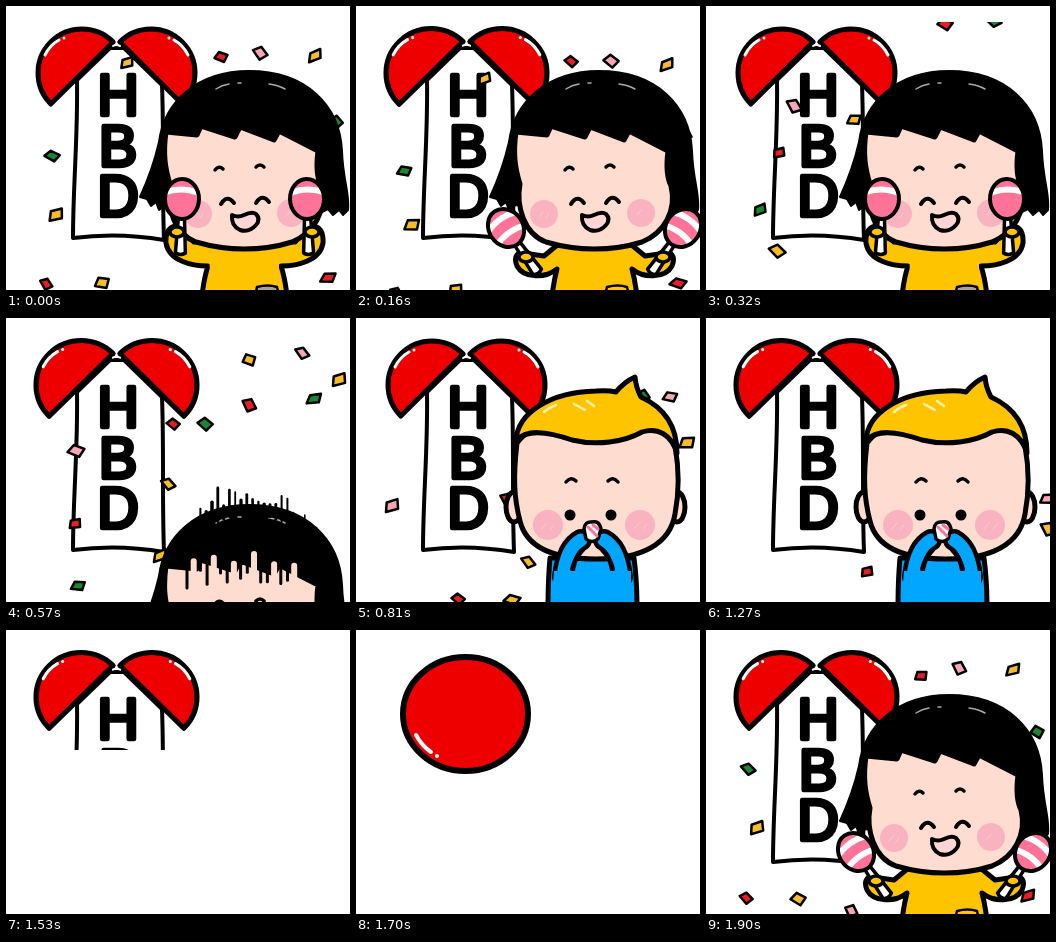
Write an HTML page with a canvas that moves like this. It is 344 by 284 pixels and loops after 2 s.

```html
<!DOCTYPE html>
<html lang="en">
<head>
<meta charset="utf-8">
<title>Birthday party</title>
<style>
html, body { margin: 0; width: 100%; height: 100%; overflow: hidden; background: #fff; }
canvas { display: block; }
</style>
</head>
<body>
<canvas id="stage" width="344" height="284"></canvas>
<script>
const ctx = document.getElementById('stage').getContext('2d');
const LOOP = 2000;
const STEPS = [0, 90, 170, 250, 320, 410, 490, 570, 640, 730, 810, 970, 1070, 1270, 1430, 1530, 1610, 1700, 1800, 1900];
const RED = '#ee0000', YELLOW = '#ffc400', SKIN = '#ffdcd0', BLUSH = '#f9b3c0', PINK = '#ff7399', BLUE = '#00a6ff';
const PAPER = { r: '#ec1c24', p: '#f8a5b5', y: '#f6bd27', g: '#168a30' };

// Confetti: colour, index of the first key time, then x, y for each key
const KEYS = [-100, 0, 320, 570, 810, 1270];
const CONFETTI = [
  ['r', 0, 215, 46, 215, 51], ['p', 0, 253, 38, 254, 47], ['y', 0, 307, 40, 309, 50],
  ['g', 0, 331, 102, 330, 116], ['g', 0, 42, 139, 46, 150, 54, 204, 72, 268],
  ['y', 0, 51, 198, 50, 209, 71, 245], ['r', 0, 40, 268, 40, 278],
  ['y', 0, 92, 269, 96, 277], ['r', 0, 322, 266, 322, 272], ['p', 0, 145, 281],
  ['y', 1, 121, 57, 148, 114, 162, 166, 172, 244],
  ['p', 2, 88, 100, 70, 133, 36, 188], ['r', 2, 73, 147, 69, 206, 102, 281],
  ['r', 2, 239, 18, 243, 87], ['g', 2, 287, 15, 308, 81], ['y', 3, 243, 42],
  ['p', 3, 296, 35, 314, 79, 341, 181], ['y', 3, 333, 62, 331, 125, 342, 211],
  ['r', 3, 167, 106, 150, 181, 161, 254], ['g', 3, 199, 106],
  ['y', 3, 154, 238, 156, 282], ['g', 4, 287, 78]
];

function paint(path, fill, width = 5, stroke = '#000') {
  if (fill) { ctx.fillStyle = fill; ctx.fill(path); }
  if (width) { ctx.lineWidth = width; ctx.strokeStyle = stroke; ctx.stroke(path); }
}
const shape = (d, fill, width, stroke) => paint(new Path2D(d), fill, width, stroke);
const line = (d, width, stroke) => shape(d, null, width, stroke);

function oval(x, y, rx, ry, fill, width = 0) {
  const p = new Path2D();
  p.ellipse(x, y, rx, ry, 0, 0, Math.PI * 2);
  paint(p, fill, width);
}

function group(draw) {
  ctx.save();
  draw();
  ctx.restore();
}

function clipped(top, bottom, draw) {
  group(() => {
    ctx.beginPath();
    ctx.rect(0, top, 344, bottom - top);
    ctx.clip();
    draw();
  });
}

// Draws a part and its reflection about a vertical axis
function mirrored(axis, draw) {
  group(draw);
  group(() => {
    ctx.translate(2 * axis, 0);
    ctx.scale(-1, 1);
    draw();
  });
}

function random(seed) {
  return () => {
    seed = (seed * 16807) % 2147483647;
    return seed / 2147483647;
  };
}

function ribbon() {
  shape('M104 42H118L156 79C158 130 156 180 158 234Q112 226 67 232C67 180 72 130 71 74Z', '#fff', 4);
  ctx.font = '57px "Liberation Sans", Arial, sans-serif';
  ctx.textAlign = 'center';
  ctx.fillStyle = ctx.strokeStyle = '#000';
  ctx.lineWidth = 4.5;
  [...'HBD'].forEach((c, i) => {
    const y = 109 + i * 50.7;
    ctx.fillText(c, 112, y);
    ctx.strokeText(c, 112, y);
  });
}

function openBall(wide, turn) {
  group(() => {
    ctx.translate(110.5, 70);
    ctx.scale(wide ? 1.025 : 1, wide ? 1.01 : 1);
    ctx.translate(-110.5, -70);
    mirrored(110.5, () => {
      ctx.translate(110, 40);
      ctx.rotate(-turn);
      ctx.translate(-110, -40);
      const half = new Path2D();
      half.arc(76, 67, 44, 2.36, 5.5);
      half.closePath();
      paint(half, RED);
      line('M39 49Q44 39 53 34', 3, '#fff');
      oval(58, 32, 1.5, 1.5, '#fff');
    });
    if (!turn) line('M107 40Q110 38 114 40', 2, '#fff');
  });
}

function closedBall() {
  oval(109.5, 84, 62.5, 57, RED, 6);
  line('M60 105Q66 116 75 122', 4, '#fff');
  oval(81, 126, 2, 2, '#fff');
}

function place(keys, first, t) {
  const n = keys.length / 2;
  if (t < KEYS[first] - 95 || t > KEYS[first + n - 1] + 159) return null;
  if (n === 1) return [keys[0], keys[1] + 0.24 * (t - KEYS[first])];
  let i = 0;
  while (i < n - 2 && t > KEYS[first + i + 1]) i++;
  const a = KEYS[first + i], u = (t - a) / (KEYS[first + i + 1] - a);
  return [0, 1].map(k => keys[2 * i + k] + (keys[2 * i + 2 + k] - keys[2 * i + k]) * u);
}

function confetti(t) {
  const time = t >= 1850 ? t - LOOP : t;
  CONFETTI.forEach(([colour, first, ...keys], i) => {
    const at = place(keys, first, time);
    if (!at) return;
    group(() => {
      ctx.translate(...at);
      ctx.rotate(Math.sin(i * 2.3 + time / 190) * 0.7);
      const w = 6.5 + i % 3, h = 5 + i % 2;
      shape(`M${-w} 1L-2 ${-h}L${w} -2L3 ${h}Z`, PAPER[colour], 2.5);
    });
  });
}

function maraca(x, y, angle, bands) {
  ctx.translate(x, y);
  ctx.rotate(angle);
  shape('M-3 18L-5 54Q0 57 5 54L3 18Z', '#fff', 3.5);
  const head = new Path2D();
  head.ellipse(0, 0, 17, 20, 0, 0, Math.PI * 2);
  paint(head, PINK, 0);
  group(() => {
    ctx.clip(head);
    bands.forEach(b => line(`M-20 ${b}Q0 ${b - 9} 20 ${b}`, 6, '#fff'));
  });
  paint(head, null, 4);
}

// Left half of the body with its arm, open at the middle
const HALF_BODY = {
  up: 'M196 290Q198 272 202 260C186 260 163 255 160 237C159 222 168 217 176 222L188 236H238',
  down: 'M196 290Q198 274 201 263C190 272 168 273 161 260C156 248 166 242 174 248L188 250L205 236H238'
};

function girlBody(low) {
  shape('M203 236H273L282 290H197Z', YELLOW, 0);
  mirrored(238.5, () => shape(HALF_BODY[low ? 'down' : 'up'], YELLOW));
  shape('M203 236H273V270H204Z', YELLOW, 0);
  shape('M249 290L251 281Q262 278 271 281L273 290Z', low ? YELLOW : '#aaa299', 2.5);
}

function girlHand(low) {
  group(() => low ? maraca(150, 222, -0.62, [-6, 10]) : maraca(176, 193, 0.03, [-5]));
  if (low) oval(170, 251, 7, 5, YELLOW, 3.5);
  else oval(171, 226, 7, 5, YELLOW, 3.5);
}

function streaks(axis, top, bangs) {
  const rnd = random(77);
  for (let i = 0; i < 24; i++) {
    const x = axis - 66 + i * 5.8, y = top + 0.0088 * (x - axis) ** 2;
    line(`M${x} ${y + 8}V${y - 2 - rnd() * 24}`, 1.5 + rnd() * 2);
  }
  if (!bangs) return;
  for (let i = 0; i < 17; i++) {
    const x = 181 + i * 6.7, skin = i % 3 === 1;
    if (skin) line(`M${x} 138V${114 + rnd() * 12}`, 6, SKIN);
    else line(`M${x} 124V${130 + rnd() * 18}`, 3);
  }
}

function girl(low, falling) {
  shape('M160 199L153 204L150 196L145 200L141 193L134 191C140 178 147 162 153 136' +
    'C158 96 191 65 243 65C301 65 334 100 336 145C337 175 344 188 342 204' +
    'L337 209L333 204L327 209L322 203L316 206Z', '#000', 2);
  girlBody(low);
  shape('M160 126C157 148 159 162 164 178C160 200 168 228 190 236Q214 243 238 243' +
    'Q264 243 286 236C308 227 321 205 315 180Q309 168 312 145' +
    'L273 125L268 134L234 121L229 131L195 120L191 129Z', SKIN);
  line('M210 83Q216 79 223 78M232 77L235 77M263 78Q272 79 279 83', 1.5, '#aaa');
  line('M209 164Q213 159 217 163M250 161Q254 157 258 161', 3.5);
  const left = low ? 188 : 192;
  oval(left, 208, 14, 14, BLUSH);
  oval(285, 207, 14, 14, BLUSH);
  line(`M${left - 5} 211l4 -5M${left + 2} 212l3 -5M281 209l4 -5`, 1, '#fbc9d2');
  line('M215 198Q221 188 228 197M250 197Q256 187 263 196', 4);
  shape('M226 209Q232 212 238 209Q246 205 250 208Q255 213 250 219' +
    'Q243 227 234 224Q225 220 226 209Z', '#ffd5d5', 4);
  mirrored(238.5, () => girlHand(low));
  if (falling) streaks(243, 65, true);
}

function boyArm() {
  const arm = 'M207 259Q210 230 225 222';
  line(arm, 22);
  line(arm, 13, BLUE);
}

function boy(moving) {
  mirrored(239.5, () => oval(158, 189, 8, 15, SKIN, 5));
  shape('M194 240Q192 262 192 290H281Q281 262 278 240Z', BLUE);
  shape('M161 125C157 160 158 180 164 203C171 232 202 241 240 241' +
    'C286 241 314 226 319 196C324 170 323 150 319 128C300 90 190 85 161 125Z', SKIN);
  shape('M160 123C161 95 194 74 240 73Q252 72 260 74Q268 64 279 59Q280 70 285 79' +
    'C309 90 321 109 321 135C315 116 301 109 286 114C268 124 241 128 216 122' +
    'C190 113 170 111 160 123Z', YELLOW);
  line('M188 94Q194 89 200 87M218 86L229 92M231 83L238 88', 2.5, '#fff0b8');
  line('M210 164Q215 158 220 163M252 163Q257 158 262 164', 3.5);
  oval(214, 197, 5.5, 5.5, '#000');
  oval(255, 197, 5.5, 5.5, '#000');
  oval(192, 207, 15, 15, BLUSH);
  oval(284, 207, 15, 15, BLUSH);
  line('M186 211l5 -6M194 212l4 -5M278 211l5 -6M287 211l4 -5', 1, '#fbc9d2');
  mirrored(236.5, boyArm);
  shape('M198 253H275V290H195Z', BLUE, 0);
  line('M216 251Q218 241 227 232M257 251Q255 241 246 232', 4);
  shape('M228 211Q229 203 236 204Q243 202 245 211L242 221Q236 226 230 221Z', '#fff', 3.5);
  line('M232 209L241 218M237 207L242 211', 3, PINK);
  if (moving) streaks(240, 74, false);
}

function actor(t, low) {
  const fall = { 570: 122, 640: 122, 730: 35, 1430: 122, 1800: 122 }[t] || 0;
  ctx.translate(0, fall);
  if (t < 640 || t >= 1800) girl(low, fall > 0);
  else if (t < 1530) boy(fall > 0);
}

function scene(t, index) {
  const wide = index % 2 === 1;
  ctx.fillStyle = '#fff';
  ctx.fillRect(0, 0, 344, 284);
  ctx.lineJoin = ctx.lineCap = 'round';
  if (t === 1700) return closedBall();
  if (t !== 1610) clipped(0, t === 1530 ? 120 : 284, ribbon);
  openBall(wide, t === 1610 ? 0.45 : 0);
  clipped(16, 284, () => confetti(t));
  group(() => actor(t, wide));
}

let shown = -1;
const start = performance.now();
function tick() {
  const t = (performance.now() - start) % LOOP;
  const index = STEPS.filter(s => s <= t).length - 1;
  if (index !== shown) scene(STEPS[shown = index], index);
  requestAnimationFrame(tick);
}
scene(0, 0);
requestAnimationFrame(tick);
</script>
</body>
</html>
```
